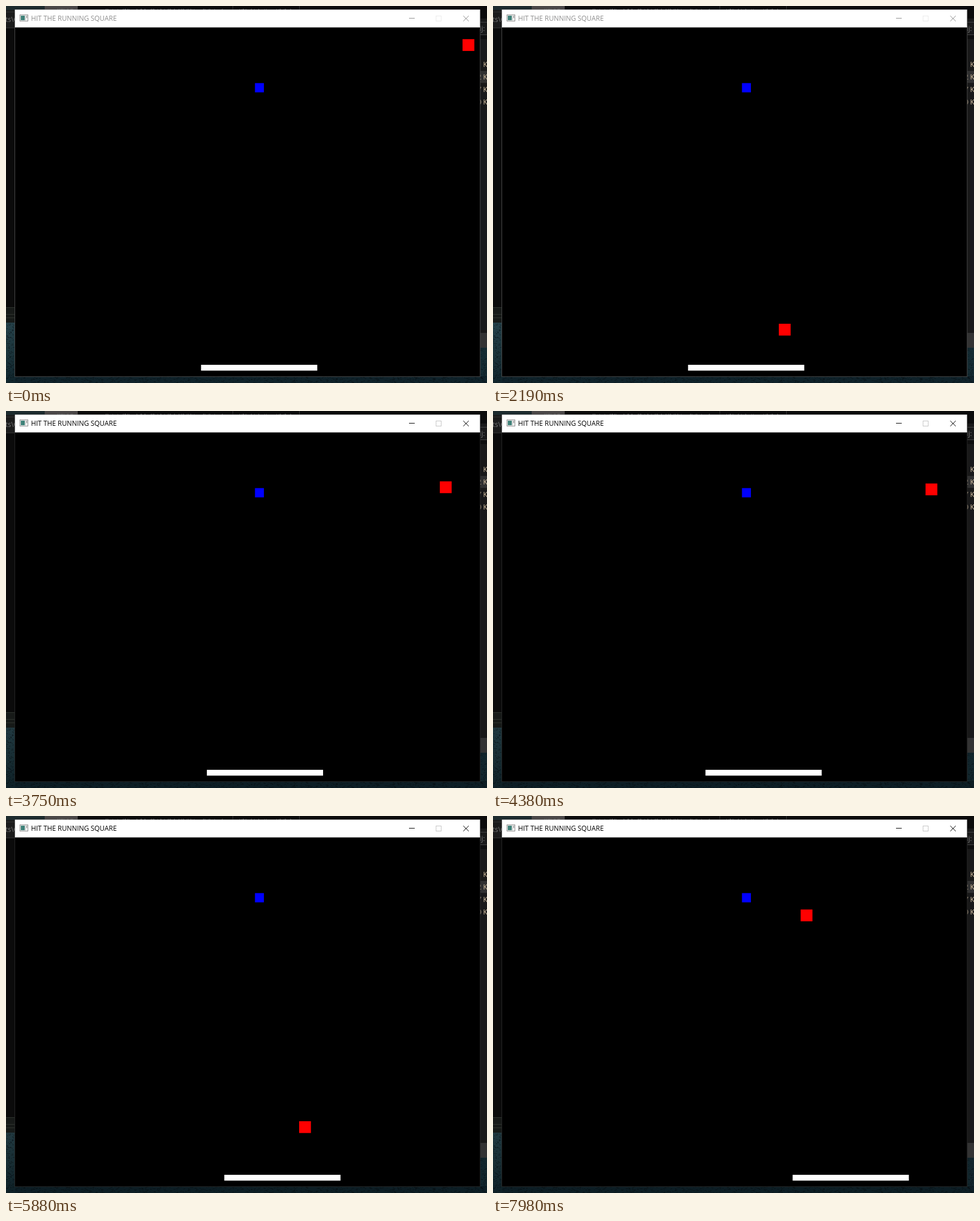
Write an HTML page that moves like this. It is 845 px wide and 662 px high and loops after 8 s.

```html
<!DOCTYPE html>
<html lang="en">
<head>
<meta charset="utf-8">
<title>Hit the running square</title>
<style>
  html, body { margin: 0; width: 100%; height: 100%; overflow: hidden; background: #000; }
  svg { display: block; width: 845px; height: 662px; }
  text { font-family: "Open Sans", "Noto Sans", sans-serif; font-size: 12px; }
  .title { font-size: 11.9px; }
  .unfocused { --ink: #8f8f8f; --faint: #ebebeb; --edge: #484848; --shade: 0; }
  .focused { --ink: #000; --faint: #c6c6c6; --edge: #262626; --shade: .12; }
  .ink { fill: var(--ink); }
  .line { stroke: var(--ink); fill: none; }
  .faint { stroke: var(--faint); fill: none; }
</style>
</head>
<body>
<svg id="stage" class="unfocused" viewBox="0 0 845 662">
  <defs>
    <linearGradient id="water" x1="0" y1="0" x2="0" y2="1">
      <stop offset="0" stop-color="#254149"/>
      <stop offset=".5" stop-color="#1b343b"/>
      <stop offset="1" stop-color="#10252c"/>
    </linearGradient>
    <clipPath id="client"><rect x="16" y="37.6" width="816.6" height="613"/></clipPath>
  </defs>

  <!-- desktop behind the window -->
  <rect width="845" height="662" fill="#0b0b0b"/>
  <rect width="68" height="7" fill="#1d2b2e"/>
  <rect x="68" width="58" height="7" fill="#4b4848"/>
  <path id="tabs" stroke="#777" stroke-opacity=".6" fill="none"/>
  <path d="M398.5 0V6M515.5 0V6" stroke="#333"/>
  <rect y="7" width="16" height="32" fill="#1c1c1c"/>
  <path d="M0 10.5H16M0 38.5H16" stroke="#333"/>
  <text x="-1" y="28" fill="#777">ts\C</text>
  <rect y="529" width="16" height="27" fill="#171a18"/>
  <path d="M0 529.5H16M0 541.5H16M0 547.5H16" stroke="#30352f"/>

  <rect x="832" y="22" width="13" height="578" fill="#191919"/>
  <path d="M832 28.5H845M832 50.5H845" stroke="#444"/>
  <rect x="832" y="51" width="13" height="7" fill="#0e0e0e"/>
  <rect x="832" y="114" width="13" height="21" fill="#303030"/>
  <rect x="832" y="574" width="13" height="26" fill="#333"/>
  <text x="832" y="44" fill="#777">ij:</text>
  <g id="sizes" fill="#d8c3a4"></g>

  <rect y="556" width="16" height="106" fill="url(#water)"/>
  <rect x="832" y="600" width="13" height="62" fill="#142b32"/>
  <rect x="16" y="650" width="829" height="12" fill="#0f222a"/>
  <path id="ripples" stroke="#050d11" stroke-opacity=".45" fill="none"/>
  <path d="M0 556H16V651H833V600H845V662H0Z" style="opacity:var(--shade)"/>

  <!-- window -->
  <rect x="15.5" y="6.5" width="817.5" height="644.3" fill="#000" style="stroke:var(--edge)"/>
  <rect x="15.7" y="6.4" width="817" height="31.2" fill="#fff"/>
  <rect x="24.5" y="15.5" width="14" height="11" fill="#f4f4f4" stroke="#8c8c8c"/>
  <rect x="26" y="17" width="7" height="8" fill="#3f8178"/>
  <path d="M34.5 17V25" stroke="#bbb"/>
  <path d="M36.5 17V21" stroke="#777"/>
  <text class="title ink" x="44" y="26">HIT THE RUNNING SQUARE</text>
  <path class="line" d="M708 21.5H718M803.3 17.2L813 26.8M813 17.2L803.3 26.8"/>
  <rect class="faint" x="755.5" y="17.5" width="9" height="9"/>

  <!-- playfield, 800 x 600 units -->
  <g clip-path="url(#client)">
    <g transform="translate(16 38) scale(1.0208)">
      <rect x="412.8" y="95.4" width="15.4" height="15.9" fill="#00f"/>
      <rect id="paddle" y="580" width="200" height="10" fill="#fff"/>
      <rect id="runner" width="20.3" height="20.3" fill="#f00"/>
    </g>
  </g>
</svg>
<script>
const LOOP = 8000, STEP = 30, FOCUS_AT = 2850;
const $ = id => document.getElementById(id);

// time, x, y
const route = [
  [0, 770, 19.8], [1230, 568.3, 356], [1964, 448.3, 556], [2019, 448.3, 556],
  [3120, 628.2, 255.7], [4057, 781, 0], [4380, 728.7, 87.5], [5880, 488.8, 487.8],
  [6135, 448, 556], [6150, 448, 556], [7080, 470.8, 307.8], [7290, 476.4, 252],
  [7752, 501.5, 0], [7980, 513.8, 123.6]
];

// time and direction of each key press
const presses = [
  [3700, 1], [3950, 1], [4200, 1], [4600, 1], [5300, 1],
  [5760, -1], [6200, -1], [7190, 1]
];
for (let i = 0; i < 14; i++) presses.push([7470 + i * 38, 1]);

function runnerAt(t) {
  const i = Math.max(1, route.findIndex(p => p[0] >= t));
  const [t0, x0, y0] = route[i - 1], [t1, x1, y1] = route[i];
  const k = (t - t0) / (t1 - t0);
  return [x0 + (x1 - x0) * k, y0 + (y1 - y0) * k];
}

const paddleAt = t =>
  presses.reduce((x, [at, dir]) => at <= t ? x + 10 * dir : x, 320);

let seed = 7;
const random = () => (seed = seed * 16807 % 2147483647) / 2147483647;

function dashes(count, x, y, w, h, longest) {
  let d = "";
  for (let i = 0; i < count; i++) {
    const px = Math.floor(x + random() * w), py = Math.floor(y + random() * h) + .5;
    d += `M${px} ${py}h${1 + Math.floor(random() * longest)}`;
  }
  return d;
}

$("ripples").setAttribute("d",
  dashes(130, 0, 558, 13, 104, 3) +
  dashes(70, 833, 600, 10, 62, 3) +
  dashes(750, 16, 651, 825, 11, 4));
$("tabs").setAttribute("d",
  dashes(14, 90, 5, 30, 2, 3) + dashes(45, 172, 5, 212, 1, 2) + dashes(20, 410, 5, 92, 1, 2));

["1 K", "2 K", "7 K", "0 K"].forEach((label, i) => {
  const text = document.createElementNS("http://www.w3.org/2000/svg", "text");
  text.setAttribute("x", 828.3);
  text.setAttribute("y", 107 + 22 * i);
  text.textContent = label;
  $("sizes").append(text);
});

function draw(now) {
  const t = Math.floor(now % LOOP / STEP) * STEP;
  const [x, y] = runnerAt(t);
  $("runner").setAttribute("x", x);
  $("runner").setAttribute("y", y);
  $("paddle").setAttribute("x", paddleAt(t));
  $("stage").setAttribute("class", t < FOCUS_AT ? "unfocused" : "focused");
}

let start;
function tick(now) {
  start ??= now;
  draw(Math.max(0, now - start));
  requestAnimationFrame(tick);
}
draw(0);
requestAnimationFrame(tick);
</script>
</body>
</html>
```
